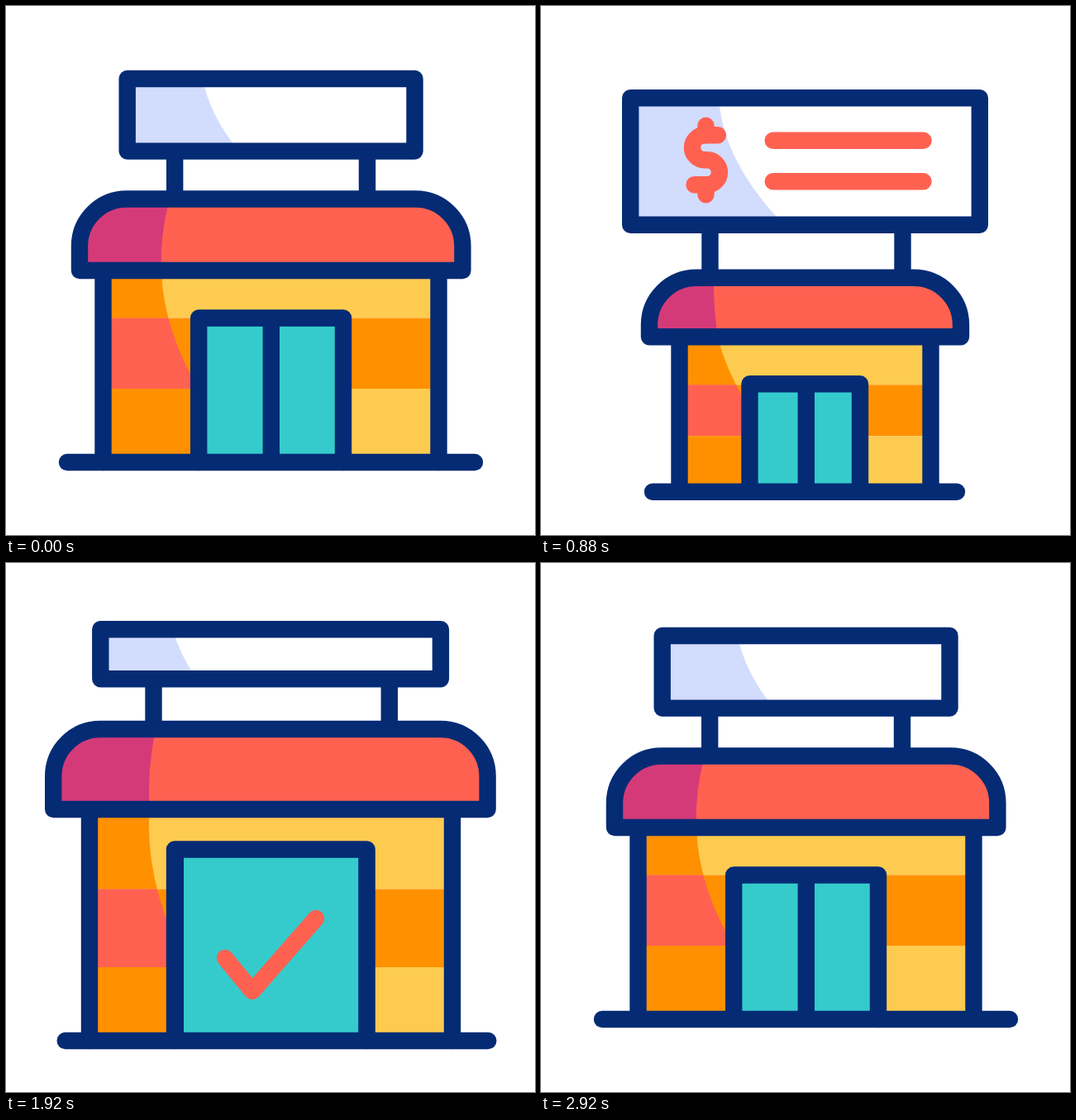
Write an HTML page with a canvas that moves like this. It is 640 px wide and 640 px high and loops after 3000 ms.

```html
<!DOCTYPE html>
<html lang="en">
<head>
<meta charset="utf-8">
<title>Shop sign and open door</title>
<style>
  html, body { margin: 0; width: 100%; height: 100%; overflow: hidden; background: #fff; }
  canvas { display: block; width: 640px; height: 640px; }
</style>
</head>
<body>
<canvas id="stage"></canvas>
<script>
const NAVY = '#042b74', RED = '#ff6151', PLUM = '#d53a78', ORANGE = '#ff9100',
      YELLOW = '#fdcb50', TEAL = '#35cbcc', LILAC = '#d2dcfd';
const LINE = 20.4, LOOP = 3000, STEP = 40, CORNER = 57;

// Every y is measured from the ground line; x pairs are left and right.
const closed = {
  ground: 552, groundX: [74, 567], wallX: [117.5, 523.5], bands: [-174.5, -89],
  roofX: [89, 552.4], roofY: [-318.5, -232], signX: [146.7, 494.5], signY: [-464, -376.4],
  postX: [204.2, 437], doorX: [233.2, 408], doorY: -174.5,
  signShade: [238, 246, 282], roofShade: [198, 186, 188],
  wallShade: [190, -157, 240, -77]
};
const signUp = {
  ground: 569.5, groundX: [135, 503], wallX: [167.5, 471.5], bands: [-129.5, -67.5],
  roofX: [131, 508], roofY: [-259, -187.5], signX: [108.2, 530.8], signY: [-476.5, -323],
  postX: [204.5, 437.5], doorX: [252.5, 386], doorY: -130.5,
  signShade: [215, 220, 294], roofShade: [209, 208.5, 214],
  wallShade: [222, -149.5, 258, -89.5]
};
const doorOpen = {
  ground: 578, groundX: [71.7, 583.3], wallX: [101, 540], bands: [-183.5, -89],
  roofX: [57.2, 582.6], roofY: [-377, -280], signX: [114.3, 525.9], signY: [-497.7, -437.8],
  postX: [178.5, 463.8], doorX: [204, 436.6], doorY: -231.5,
  signShade: [201.6, 210, 230.5], roofShade: [181, 170.8, 173.5],
  wallShade: [168, -200, 209, -110]
};

const lerp = (a, b, k) => a + (b - a) * k;
const smooth = k => k * k * (3 - 2 * k);
const span = (t, from, to) => Math.min(1, Math.max(0, (t - from) / (to - from)));

// cubic-bezier(.57, 0, .27, 1)
function ease(x) {
  let lo = 0, hi = 1;
  for (let i = 0; i < 24; i++) {
    const u = (lo + hi) / 2, v = 1 - u;
    if (3 * u * v * v * .57 + 3 * u * u * v * .27 + u * u * u < x) lo = u; else hi = u;
  }
  return smooth((lo + hi) / 2);
}
const move = (t, from, to) => ease(span(t, from, to));

function mix(a, b, k) {
  if (k <= 0) return a;
  if (k >= 1) return b;
  const out = {};
  for (const key in a) {
    out[key] = Array.isArray(a[key])
      ? a[key].map((v, i) => lerp(v, b[key][i], k))
      : lerp(a[key], b[key], k);
  }
  return out;
}

const canvas = document.getElementById('stage');
const ctx = canvas.getContext('2d');
const ratio = window.devicePixelRatio || 1;
canvas.width = canvas.height = 640 * ratio;

function box(x0, y0, x1, y1, color) {
  ctx.fillStyle = color;
  ctx.fillRect(x0, y0, x1 - x0, y1 - y0);
}
function stroke(d, color = NAVY) {
  ctx.strokeStyle = color;
  ctx.stroke(new Path2D(d));
}
function fill(d, color) {
  ctx.fillStyle = color;
  ctx.fill(new Path2D(d));
}
function clipped(d, draw) {
  ctx.save();
  ctx.clip(new Path2D(d));
  draw();
  ctx.restore();
}
const rect = (x0, y0, x1, y1) => `M${x0} ${y0}H${x1}V${y1}H${x0}Z`;

function drawWalls(s) {
  const [x0, x1] = s.wallX, top = s.roofY[1], [b0, b1] = s.bands;
  const bands = (main, mid) => {
    box(x0, top, x1, b0, main);
    box(x0, b0, x1, b1, mid);
    box(x0, b1, x1, 0, main);
  };
  bands(YELLOW, ORANGE);
  const [cx, cy, ex, ey] = s.wallShade;
  const shade = `M${x0} ${top}H${s.roofShade[2]}Q${cx} ${cy} ${ex} ${ey}V0H${x0}Z`;
  clipped(shade, () => bands(ORANGE, RED));
  stroke(`M${x0} ${top}V0M${x1} ${top}V0`);
}

function drawDoor(s, open, check) {
  const [x0, x1] = s.doorX, frame = rect(x0, s.doorY, x1, 0);
  fill(frame, TEAL);
  clipped(frame, () => {
    const y = -190 * (1 - check);
    stroke(`M265 ${y - 98.5}L298 ${y - 58.5}L375 ${y - 146.5}`, RED);
    const gap = 116 * open;
    stroke(`M${320.8 - gap} ${s.doorY}V0M${320.8 + gap} ${s.doorY}V0`);
  });
  stroke(`M${x0} 0V${s.doorY}H${x1}V0`);
}

function drawRoof(s) {
  const [x0, x1] = s.roofX, [top, bottom] = s.roofY, [a, b, c] = s.roofShade, r = CORNER;
  const roof = `M${x0} ${bottom}V${top + r}A${r} ${r} 0 0 1 ${x0 + r} ${top}` +
               `H${x1 - r}A${r} ${r} 0 0 1 ${x1} ${top + r}V${bottom}Z`;
  fill(roof, RED);
  clipped(roof, () =>
    fill(`M${x0} ${top}H${a}Q${b} ${(top + bottom) / 2} ${c} ${bottom}H${x0}Z`, PLUM));
  stroke(roof);
}

function drawSign(s, shown) {
  const [x0, x1] = s.signX, [top, bottom] = s.signY, [a, b, c] = s.signShade;
  const mid = (top + bottom) / 2, panel = rect(x0, top, x1, bottom);
  stroke(s.postX.map(x => `M${x} ${bottom}V${s.roofY[0]}`).join(''));
  fill(panel, '#fff');
  clipped(panel, () => {
    fill(`M${x0} ${top}H${a}Q${b} ${mid} ${c} ${bottom}H${x0}Z`, LILAC);
    ctx.translate(0, mid - 1.8 - 118 * (1 - shown));
    stroke('M214-30H198A15 15 0 0 0 198 0H201A15 15 0 0 1 201 30H185.5', RED);
    stroke('M199.5-41.5V-30M199.5 30V42', RED);
    stroke('M280.7-23.5H462.5M280.7 26H462.5', RED);
  });
  stroke(panel);
}

function draw(t) {
  const rise = move(t, 100, 800), swap = move(t, 1145, 1845), back = move(t, 2190, 2900);
  const s = mix(mix(mix(closed, signUp, rise), doorOpen, swap), closed, back);
  const dip = 30.2 * (smooth(span(t, 100, 500)) - smooth(span(t, 640, 1200)));
  const open = move(t, 1145, 1865) - move(t, 2300, 2900);
  const check = move(t, 1296, 1996) - move(t, 2340, 2900);

  ctx.setTransform(ratio, 0, 0, ratio, 0, 0);
  box(0, 0, 640, 640, '#fff');
  ctx.translate(0, s.ground + dip);
  ctx.lineWidth = LINE;
  ctx.lineCap = ctx.lineJoin = 'round';
  drawWalls(s);
  drawDoor(s, open, check);
  drawSign(s, rise * (1 - swap));
  drawRoof(s);
  stroke(`M${s.groundX[0]} 0H${s.groundX[1]}`);
}

const start = performance.now();
function tick() {
  const t = (performance.now() - start) % LOOP;
  draw(Math.floor(t / STEP) * STEP);
  requestAnimationFrame(tick);
}
tick();
</script>
</body>
</html>
```
